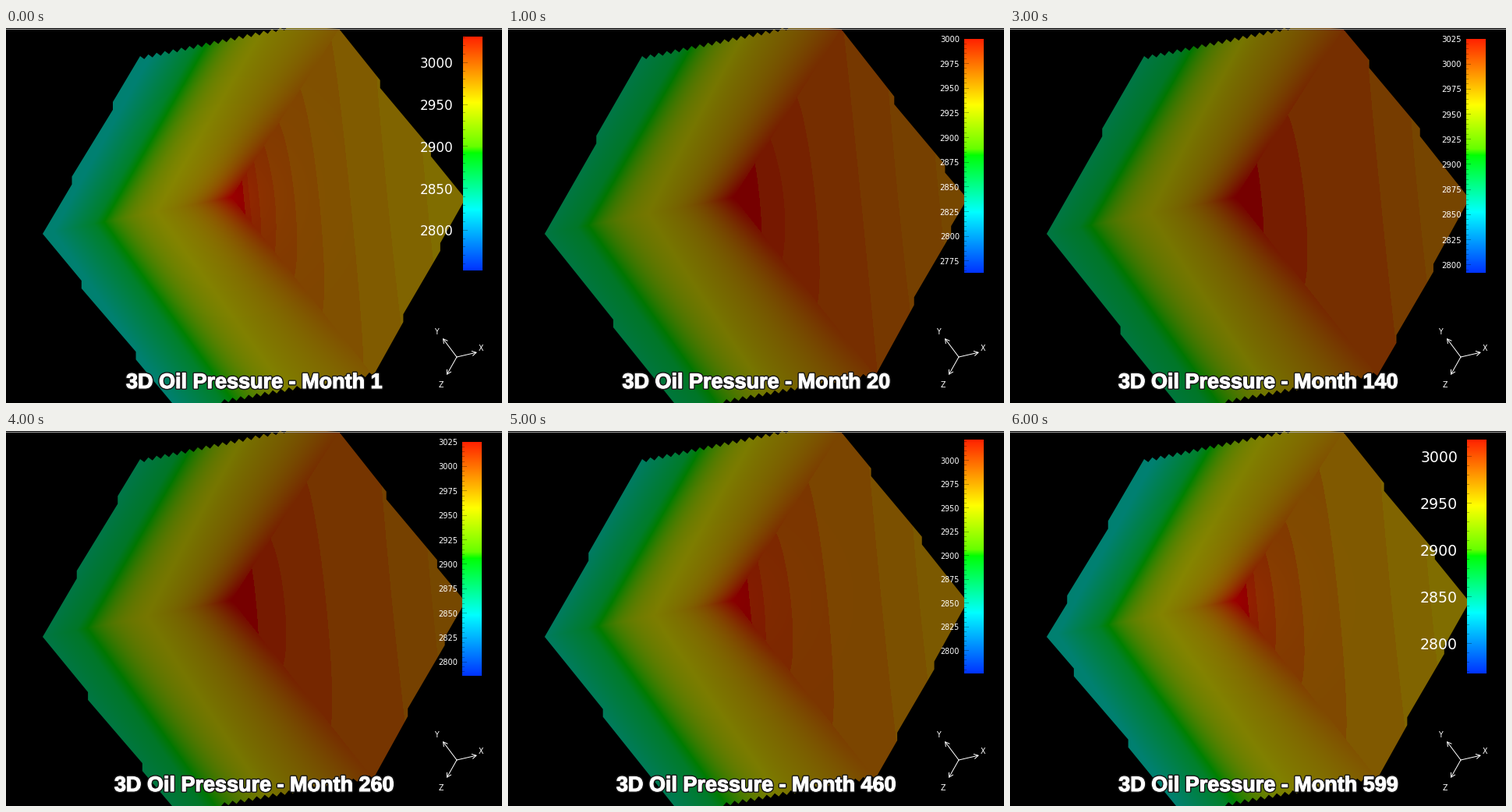
Animation, 636 px wide and 481 px high, one loop 6.5 s. Source, as a matplotlib script:

```python
import numpy as np
import matplotlib.pyplot as plt
from matplotlib.animation import FuncAnimation
from matplotlib.colors import hsv_to_rgb
from matplotlib.path import Path
from matplotlib.patheffects import Normal, Stroke

W, H, DPI = 636, 481, 64
PX = 72 / DPI  # points per pixel

# Corners of the block; the three visible faces meet at the apex.
APEX = np.array([289.0, 217.0])
CORNER, LEFT, LOW = (172, 36), (47, 264), (213, H)
TOP, RIGHT, BOTTOM = (427, 1), (589, 219), (471, 446)

# month, highest and lowest pressure, innermost contour, contour growth, first step
KEYS = np.array([
    (1, 3031, 2752, .10, 1.45, .30),
    (20, 3000, 2763, .20, 1.72, .53),
    (60, 3008, 2782, .22, 2.36, .45),
    (140, 3025, 2792, .20, 2.44, .57),
    (260, 3025, 2786, .19, 1.92, .35),
    (460, 3022, 2776, .13, 1.75, .45),
    (599, 3018, 2768, .10, 1.67, .21),
])
STEPS = 2 * len(KEYS) - 1
BAR_H = 300

GRID = np.stack(np.meshgrid(np.arange(W) + .5, np.arange(H) + .5), -1) - APEX


def state(i):
    """Key states fall on even steps, odd steps lie halfway between two."""
    now = (KEYS[i // 2] + KEYS[(i + 1) // 2]) / 2
    if i % 2:
        now[0] = round(now[0], -1)
    return now


def face_coords(a, b):
    """Pixel positions measured along the two edges apex-a and apex-b."""
    a, b = np.subtract(a, APEX), np.subtract(b, APEX)
    det = a[0] * b[1] - a[1] * b[0]
    x, y = GRID[..., 0], GRID[..., 1]
    return (x * b[1] - y * b[0]) / det, (a[0] * y - a[1] * x) / det


S, T = face_coords(TOP, BOTTOM)
U1, V1 = face_coords(LEFT, TOP)
U2, V2 = face_coords(LEFT, BOTTOM)
ON_RIGHT = (S >= 0) & (T >= 0)
ON_UPPER = (U1 >= 0) & (V1 >= 0)
U, V = np.where(ON_UPPER, U1, U2), np.maximum(np.where(ON_UPPER, V1, V2), 0)


def contour_distance():
    """Distance from the apex on the right face; contours bulge midway."""
    s, t = np.maximum(S, 1e-6), np.maximum(T, 1e-6)
    p = np.interp(s + t, [.15, .4, 1.05, 1.4], [1, 1.3, 1, .92])
    return (s ** p + t ** p) ** (1 / p)


DIST = contour_distance()


def contours(first, growth):
    levels = [first]
    while levels[-1] < 1.5:
        w = levels[-1]
        levels.append(w * growth if w < .9 else w + .37)
    return levels


def near_hue(w, warmth):
    return warmth * (1 - np.exp(-w / .28)) + 11 * w


def right_hue(warmth, levels):
    edges = np.array([0, *levels, 2])
    hues = near_hue((edges[1:] + edges[:-1]) / 2, warmth)
    hues[0] = 0
    return hues[np.digitize(DIST, levels)]


def left_hue(warmth):
    """From the edge hue to olive, then green, then teal at the far side."""
    green = .86 - .006 * warmth
    cold = 148 + .8 * warmth
    x = np.maximum(U, 0) / (green + .06 * V)
    start = near_hue(V, warmth)
    olive = 1 - np.exp(-(x / (.26 + .2 * V)) ** 1.2)
    warm = start + (62 - start) * olive + 58 * np.minimum(x, 1) ** 6
    cool = np.interp(x, [1, 1.08, 1.4], [120, 140, cold])
    return np.where(x < 1, warm, cool)


def field(warmth, levels):
    hue = np.where(ON_RIGHT, right_hue(warmth, levels), left_hue(warmth))
    glow = max(warmth - 17, 0) * .0075
    value = (.425 + .0025 * warmth
             + glow * np.exp(-np.hypot(GRID[..., 0], GRID[..., 1]) / 45))
    return hsv_to_rgb(np.stack([hue / 360, np.ones_like(hue), value], -1))


def stepped(p, q, fractions):
    """Edge from p to q with a short upright step at each fraction."""
    p, q = np.array(p, float), np.array(q, float)
    rise = np.array([0, 5 if q[1] > p[1] else -5])
    pts = [p]
    for f in sorted(fractions):
        if .04 < f < .95:
            e = p + (q - p) * f
            pts += [e - rise, e + rise]
    return pts


def sawtooth(p, q, depth, width=10.5):
    n = 2 * round(abs(q[0] - p[0]) / width)
    x, y = np.linspace(p, q, n + 1).T
    return list(zip(x, y + depth * (np.arange(n + 1) % 2)))


def outline(levels, first_step):
    # Contours of the right face reach its outer edges as steps.
    right = [(w - 1) / .92 for w in levels]
    left = [f for f in (first_step, first_step + .42) if f < .85]
    pts = sawtooth(CORNER, (362, -3), 5)
    pts += stepped(TOP, RIGHT, right)
    pts += stepped(RIGHT, BOTTOM, [1 - f for f in right])
    pts += sawtooth(BOTTOM, (275, 482), -5)
    pts += stepped(LOW, LEFT, [1 - f for f in left])
    pts += stepped(LEFT, CORNER, left)
    return Path(pts + pts[:1])


def bar_pixels(high, low, step):
    x = np.linspace(0, 1, BAR_H)
    hue = np.interp(x, [0, .25, .47, .5, .75, 1], [8, 54, 96, 122, 182, 228])
    rows = hsv_to_rgb(np.stack([hue / 360, x * 0 + 1, x * 0 + 1], -1))
    img = np.repeat(rows[:, None], 25, axis=1)
    minor = step / 5
    for p in np.arange(np.ceil(low / minor) * minor, high, minor):
        y = int((high - p) / (high - low) * BAR_H)
        img[min(y, BAR_H - 1), :6 if p % step == 0 else 3] *= .7
    return img


fig = plt.figure(figsize=(W / DPI, H / DPI), dpi=DPI, facecolor="black")
ax = fig.add_axes([0, 0, 1, 1])
ax.axis("off")

body = ax.imshow(np.zeros((H, W, 3)), extent=(0, W, H, 0),
                 interpolation="nearest", aspect="auto")
scale = ax.imshow(np.zeros((BAR_H, 25, 3)), extent=(585, 610, 311, 11),
                  interpolation="nearest", aspect="auto", zorder=2)
ax.plot([0, W], [.5, .5], color="#a8a8a8", lw=PX, zorder=3)

ticks = [ax.text(0, 0, "", color="white", ha="right", va="center_baseline",
                 family="DejaVu Sans", zorder=4) for _ in range(12)]

# Axis triad
for name, tip, spot in (("X", (604, 416), (609, 411)),
                        ("Y", (560, 398), (552, 390)),
                        ("Z", (565, 445), (558, 458))):
    ax.annotate("", tip, (578, 422), zorder=4,
                arrowprops=dict(arrowstyle="->,head_length=.42,head_width=.24",
                                color="white", lw=PX, shrinkA=0, shrinkB=0,
                                mutation_scale=14))
    ax.text(*spot, name, color="white", size=9.5 * PX, ha="center",
            va="center", family="DejaVu Sans", zorder=4)

title = ax.text(318, 462, "", color="white", size=27 * PX, weight="bold",
                family="Liberation Sans", ha="center", va="baseline", zorder=5)
title.set_path_effects([Stroke(linewidth=4 * PX, foreground="#181818"),
                        Stroke(linewidth=1.1 * PX, foreground="white"),
                        Normal()])


def draw_scale(high, low):
    span = high - low
    big = span >= 248
    step = 50 if big else 25
    gap = step * BAR_H / span
    x = 586 if big else 585
    top = 14 if high % step == 0 else 11  # room for a label at the very top
    scale.set_data(bar_pixels(high, low, step))
    scale.set_extent((x, x + 25, top + BAR_H, top))

    first = int(high // step * step)
    for k, tick in enumerate(ticks):
        p = first - k * step
        tick.set_text(str(p) if p > low + 6 else "")
        tick.set_position((574 if big else 579, top + (high - p) * gap / step))
        tick.set_size(.315 * gap * PX)


def update(i):
    month, high, low, first, growth, first_step = state(i)
    warmth = 3.1 / first
    levels = contours(first, growth)
    body.set_data(field(warmth, levels))
    body.set_clip_path(outline(levels, first_step), ax.transData)
    draw_scale(high, low)
    ax.set_xlim(0, W)
    ax.set_ylim(H, 0)
    title.set_text(f"3D Oil Pressure - Month {month:.0f}")
    return [body, scale, title, *ticks]


anim = FuncAnimation(fig, update, frames=STEPS, interval=500,
                     repeat=True, repeat_delay=0, blit=False)
plt.show()
```
